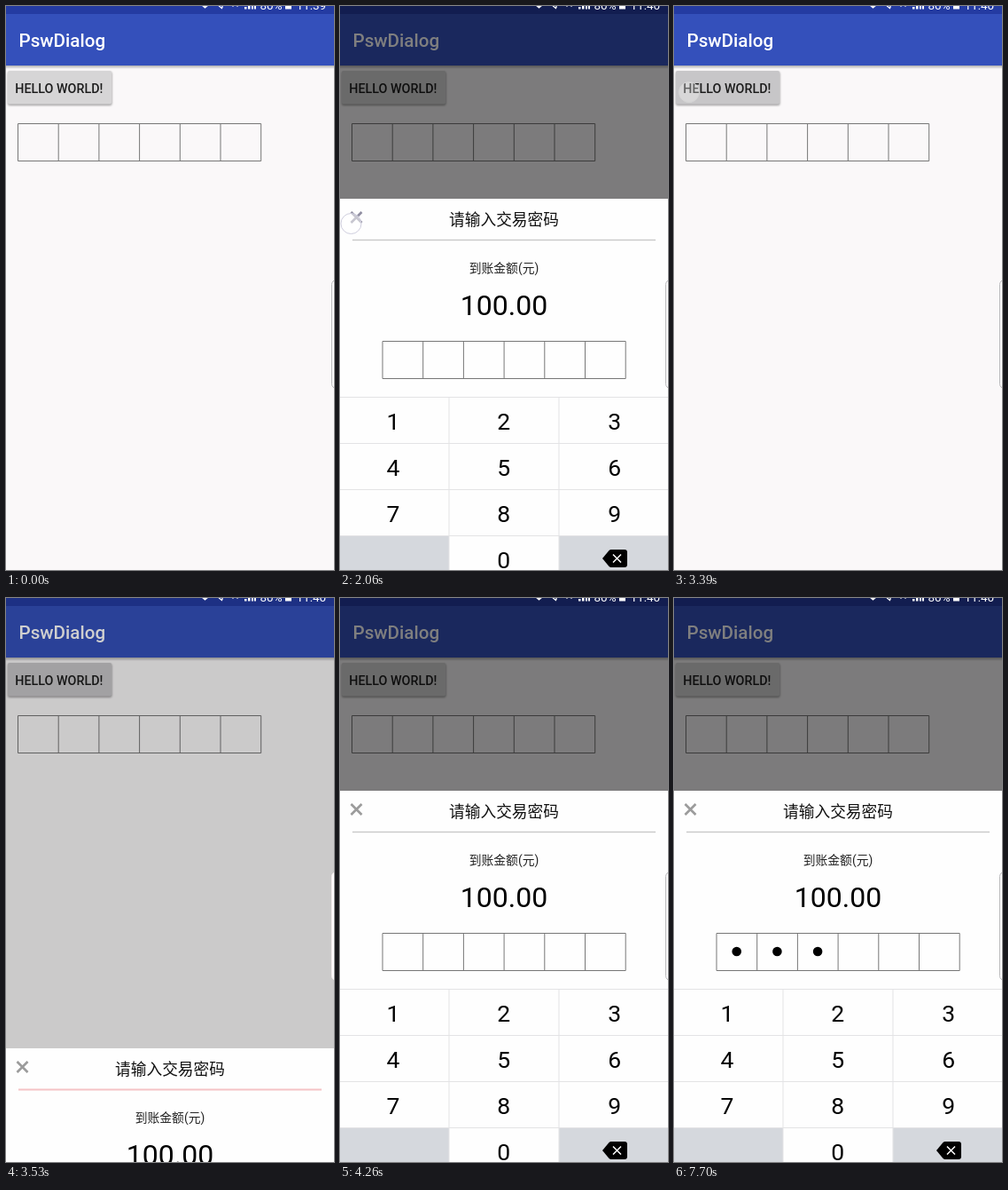
These frames come from a looping animation (370x635 px, 8 s). An HTML page:

```html
<!DOCTYPE html>
<html lang="zh">
<head>
<meta charset="utf-8">
<title>PswDialog</title>
<style>
html, body { margin: 0; width: 100%; height: 100%; overflow: hidden; background: #faf8f9; }
svg { display: block; width: 370px; height: 635px; font-family: Roboto, "Noto Sans CJK SC", "Noto Sans CJK", sans-serif; }
.mid { text-anchor: middle; }
</style>
</head>
<body>
<svg viewBox="0 0 370 635" xmlns="http://www.w3.org/2000/svg">
  <defs>
    <linearGradient id="fall" x1="0" y1="0" x2="0" y2="1">
      <stop offset="0" stop-color="#000" stop-opacity=".3"/>
      <stop offset="1" stop-color="#000" stop-opacity="0"/>
    </linearGradient>
    <filter id="soft" x="-10%" y="-20%" width="120%" height="150%"><feGaussianBlur stdDeviation="1.2"/></filter>
  </defs>

  <rect width="370" height="635" fill="#faf8f9"/>
  <rect y="67" width="370" height="4" fill="url(#fall)"/>
  <rect width="370" height="67" fill="#3450bb"/>
  <rect width="370" height="9" fill="#243ba2"/>
  <text x="14.5" y="46" font-size="20.6" font-weight="500" fill="#fff">PswDialog</text>
  <rect x="2" y="74" width="117.5" height="38" rx="2" fill="#000" opacity=".35" filter="url(#soft)"/>
  <rect id="button" x="2" y="73" width="117" height="37.5" rx="2"/>
  <text x="10.3" y="97.5" font-size="14.3" font-weight="500" fill="#1c1c1c">HELLO WORLD!</text>
  <path id="pageBoxes" fill="none" stroke="#777" stroke-width="1"/>

  <rect id="dim" width="370" height="635" fill="#000"/>

  <g id="status" fill="#fff" font-size="13.5">
    <path d="M221 -1l3.5 3 3.500-3M224.500 -2v4.500M238 -2l6 5M241 -1h3v3" fill="none" stroke="#fff" stroke-width="1.300"/>
    <path d="M255 0h2v1h-2zM260 0h2v1h-2z" opacity=".5"/>
    <path d="M269 1h2.500v2.500h-2.500zM273 0h2.500v3.500h-2.500zM277 -2h2v5.500h-2zM280 -3h2v6.500h-2zM315 -4h7v7.500h-7z"/>
    <text x="286.500" y="3.500">80%</text>
    <text id="clock" x="327.500" y="3.500"></text>
  </g>

  <g id="sheet">
    <rect y="217" width="370" height="440" fill="#fefefe"/>
    <path id="cross" d="M12.500 232l12 12m0 -12l-12 12" fill="none" stroke-width="2.600"/>
    <text class="mid" x="185" y="247.300" font-size="17.700" fill="#111">请输入交易密码</text>
    <path id="rule" d="M14 263.500H356"/>
    <text class="mid" x="185" y="300" font-size="13.800" fill="#222">到账金额(元)</text>
    <text class="mid" x="185" y="348" font-size="32" fill="#000">100.00</text>
    <path id="sheetBoxes" fill="none" stroke="#777" stroke-width="1"/>
    <g id="dots"></g>
    <path d="M0 596h123v60H0zM247 596h123v60H247z" fill="#d5d8dd"/>
    <path id="grid" d="M0 440.500H370M0 492.500H370M0 544.500H370M0 596.500H370M123 440V650M247 440V650" fill="none" stroke="#e3e3e5"/>
    <g id="keys" class="mid" font-size="26.500" fill="#000"></g>
    <path d="M296 622l7.500-9q1-1 2.500-1h15q3 0 3 3v14q0 3-3 3h-15q-1.500 0-2.500-1z"/>
    <path d="M308 617.500l9 9m0 -9l-9 9" stroke="#fff" stroke-width="1.500"/>
  </g>

  <rect id="handle" x="367.500" y="308.500" width="12" height="122" rx="5" fill="#fdfcfd"/>
  <circle id="touch" r="11.500"/>
</svg>
<script>
const LOOP = 8000, STEP = 147, SLIDE = 300, TRAVEL = 418;
const SVG = "http://www.w3.org/2000/svg";
const $ = id => document.getElementById(id);

function add(parent, tag, attrs, text = "") {
  const el = document.createElementNS(SVG, tag);
  set(el, attrs);
  el.textContent = text;
  parent.append(el);
  return el;
}
function set(el, attrs) {
  for (const key in attrs) el.setAttribute(key, attrs[key]);
}
const show = (el, on) => el.setAttribute("visibility", on ? "visible" : "hidden");
const clamp = x => Math.min(1, Math.max(0, x));
const ease = x => (1 - Math.cos(Math.PI * x)) / 2;
const between = (t, a, b) => t >= a && t < b;

// Six password cells in a row
const CELL = 45.7;
function boxes(x, y) {
  let d = `M${x} ${y}h${6 * CELL}v42h${-6 * CELL}z`;
  for (let i = 1; i < 6; i++) d += `M${x + i * CELL} ${y}v42`;
  return d;
}
set($("pageBoxes"), { d: boxes(13.5, 132.5) });
set($("sheetBoxes"), { d: boxes(48, 377.5) });

for (let n = 0; n < 10; n++) {
  const col = n ? (n - 1) % 3 : 1;
  const row = n ? Math.floor((n - 1) / 3) : 3;
  add($("keys"), "text", { x: 60 + col * 124.8, y: 477 + row * 52 }, n);
}

const dots = [5610, 6660, 7550].map((at, i) => ({
  at,
  el: add($("dots"), "circle", { cx: 70.7 + i * CELL, cy: 398, r: 5.3 })
}));

const touches = [
  { from: 600, to: 880, x: 17, y: 97, fill: .3, ring: "#d8d8d8" },
  { from: 2055, to: 2345, x: 12.5, y: 245, fill: .5, ring: "#cfcede" },
  { from: 3240, to: 3525, x: 17, y: 97, fill: .3, ring: "#d4d4d4" },
  { from: 5610, to: 6510, x: 49, y: 481, fill: .35, ring: "#e6e6e6" },
  { from: 6510, to: 6805, x: 195, y: 476, fill: .35, ring: "#dedede" },
  { from: 7400, to: 7695, x: 311, y: 472, fill: .35, ring: "#dedede" }
];

// Share of the sheet's slide done, before easing
function openness(t) {
  if (t < 2200) return clamp((t - 762) / SLIDE);
  if (t < 3000) return 1 - clamp((t - 2200) / SLIDE);
  return clamp((t - 3416) / SLIDE);
}

function draw(t) {
  const open = openness(Math.floor(t / STEP) * STEP);
  const slid = ease(open), settled = open === 1;
  const pressed = between(t, 600, 1175) || between(t, 3240, 3675);

  set($("button"), { fill: pressed ? "#c7c6c8" : "#d6d5d6" });
  set($("dim"), { opacity: open * .5 });
  $("clock").textContent = t < 600 ? "11:39" : "11:40";

  show($("sheet"), open > 0);
  set($("sheet"), { transform: `translate(0 ${TRAVEL * (1 - slid)})` });
  set($("cross"), { stroke: between(t, 2055, 2345) ? "#8f8da0" : "#9b9b9b" });
  set($("rule"), {
    stroke: settled ? "#cacaca" : slid > .8 ? "#dfa3ac" : "#f5c3c6",
    "stroke-width": settled ? 1.6 : slid > .8 ? 1 : 2
  });
  $("grid").style.display = settled ? "" : "none";
  set($("handle"), { stroke: open > 0 && slid < .75 ? "#f7eef0" : "#b8b8ba" });

  for (const dot of dots) dot.el.style.display = t >= dot.at ? "" : "none";

  const touch = touches.find(p => between(t, p.from, p.to));
  show($("touch"), touch);
  if (touch) set($("touch"), {
    cx: touch.x, cy: touch.y, stroke: touch.ring,
    fill: `rgba(255,255,255,${touch.fill})`
  });
}

const start = performance.now();
function tick() {
  draw((performance.now() - start) % LOOP);
  requestAnimationFrame(tick);
}
tick();
</script>
</body>
</html>
```
